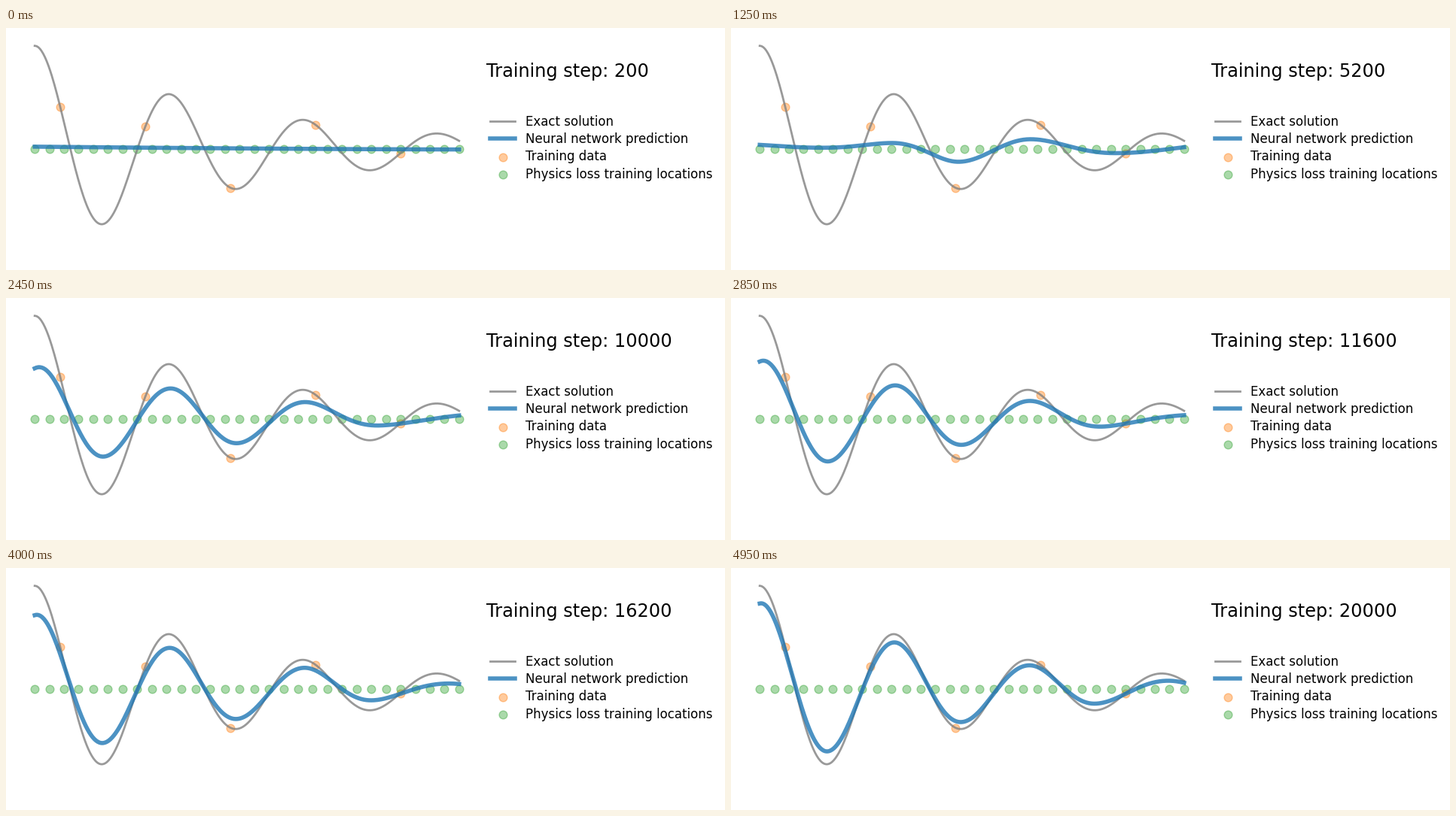
A matplotlib script that plays this animation: 955x322 px, repeating every 5 s.

```python
import numpy as np
import matplotlib.pyplot as plt
from matplotlib.animation import FuncAnimation

W, H, DPI = 955, 322, 100
FRAMES, INTERVAL = 100, 50
STEPS_PER_FRAME = 200

# Axes box in pixels, and pixels per data unit
LEFT, BOTTOM, AX_W, AX_H = 10, 10, 620, 302
PX_X, PX_Y = AX_W / 1.1, AX_H / 2.2
X0 = LEFT + 0.05 * PX_X
HALF = 89  # half a period in pixels

# Turning points of the prediction: pixel position, height above zero
FIT = [(20, 6), (122, 1.7), (214, 8), (302, -17),
       (398, 13), (510, -5.5), (660, 6.5)]
EARLY = [(48, 50.5), (130, -36), (220, 32), (307, -28),
         (398, 20), (500, -7), (650, 8)]
FINAL = [(40, 114), (127.5, -83), (217, 62), (305, -44),
         (396.5, 31.5), (482.5, -19.5), (581, 11)]


def oscillator(x, d=2, w0=20):
    """Underdamped oscillator released from rest at height 1."""
    w = np.sqrt(w0**2 - d**2)
    return np.exp(-d * x) * (np.cos(w * x) + d / w * np.sin(w * x))


def half_wave(u, a, b):
    """Damped half period from height a (u=0) to height b (u=1)."""
    k = np.log(np.abs(a / b)).clip(-1.1, 1.1)
    e = np.exp(-k * u) * (np.cos(np.pi * u) + k / np.pi * np.sin(np.pi * u))
    return a + (b - a) * (1 - e) / (1 + np.exp(-k))


def wave(points):
    """Curve through turning points, continued half a period each way."""
    (xa, ya), (xb, yb) = points[0], points[-1]
    ends = [(xa - HALF, -1.35 * ya)], [(xb + HALF, -0.72 * yb)]
    px, py = np.array(ends[0] + points + ends[1]).T
    at = X0 + x * PX_X
    seg = np.searchsorted(px, at, side="right") - 1
    u = (at - px[seg]) / (px[seg + 1] - px[seg])
    return half_wave(u, py[seg], py[seg + 1]) / PX_Y


def ease(frame, start, end):
    t = np.clip((frame - start) / (end - start), 0, 1)
    return t * t * (3 - 2 * t)


x = np.linspace(0, 1, 500)
y = oscillator(x)
x_data, y_data = x[30::100], y[30::100]
x_physics = np.linspace(0, 1, 30)

flat = (3.7 * (1 - x)**1.5 - 0.6) / PX_Y
fit, early, final = wave(FIT), wave(EARLY), wave(FINAL)


def prediction(frame):
    """Flat line, then a fit of the data, then slow growth to the solution."""
    curve = flat + ease(frame, 7, 25) * (fit - flat)
    curve += ease(frame, 25, 36) * (early - curve)
    t = np.clip((frame - 37) / (FRAMES - 38), 0, 1)
    # Later times catch up last
    return curve + t**(0.73 * (1 + x**3)) * (final - curve)


fig = plt.figure(figsize=(W / DPI, H / DPI), dpi=DPI, facecolor="white")
ax = fig.add_axes([LEFT / W, BOTTOM / H, AX_W / W, AX_H / H])
ax.set_xlim(-0.05, 1.05)
ax.set_ylim(-1.1, 1.1)
ax.axis("off")

ax.plot(x, y, color="grey", lw=2, alpha=0.8, label="Exact solution")
line, = ax.plot(x, prediction(0), color="tab:blue", lw=4, alpha=0.8,
                label="Neural network prediction")
ax.scatter(x_data, y_data, s=60, color="tab:orange", alpha=0.4,
           label="Training data")
ax.scatter(x_physics, np.zeros(30), s=60, color="tab:green", alpha=0.4,
           label="Physics loss training locations")
ax.legend(loc=(1.01, 0.3365), frameon=False, fontsize="large",
          labelspacing=0.32)
title = ax.text(1.065, 0.7, "", fontsize="xx-large", color="black")


def update(frame):
    line.set_ydata(prediction(frame))
    title.set_text(f"Training step: {(frame + 1) * STEPS_PER_FRAME}")
    return line, title


anim = FuncAnimation(fig, update, frames=FRAMES, interval=INTERVAL,
                     repeat=True, repeat_delay=0)
plt.show()
```
